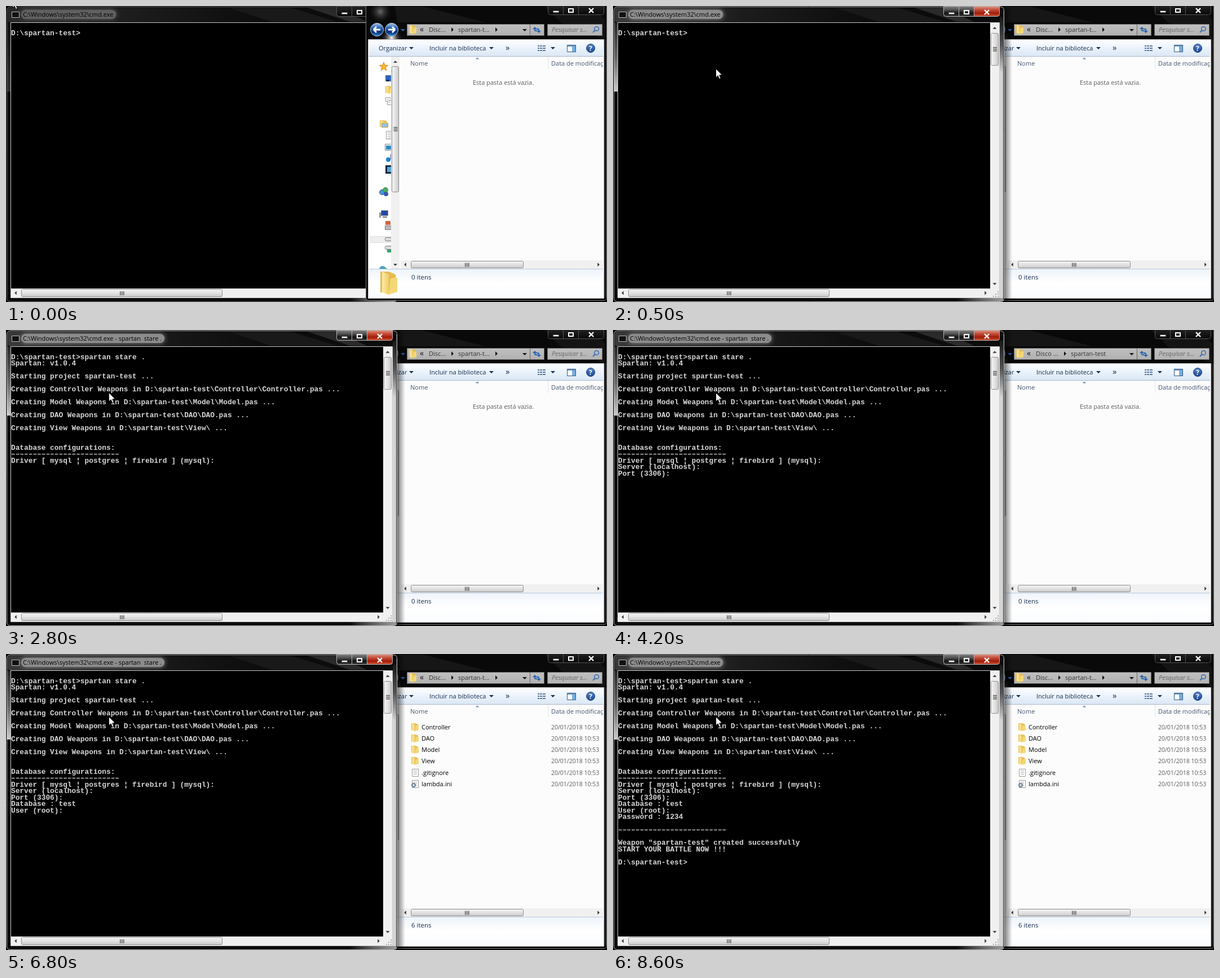
Write an HTML page with a canvas that moves like this. It is 1066 px wide and 526 px high and loops after 9.1 s.

```html
<!DOCTYPE html>
<html lang="pt">
<head>
<meta charset="utf-8">
<title>Terminal e pasta</title>
<style>
html, body { margin: 0; width: 100%; height: 100%; overflow: hidden; background: #000; }
canvas { display: block; }
</style>
</head>
<body>
<canvas id="stage" width="1066" height="526"></canvas>
<script>
const c = document.getElementById('stage').getContext('2d');
const LOOP = 9100, ACTIVATE = 300;
const UI = '"Open Sans", "Noto Sans", sans-serif';
const NAVY = '#142c4c';
const RULE = '–'.repeat(25);

// [time, row, text appended to that row]
const output = [
  [0, 0, 'D:\\spartan-test>'],
  [1000, 0, 's'], [1100, 0, 'p'], [1200, 0, 'a'], [1300, 0, 'r'], [1500, 0, 't'], [1600, 0, 'an'],
  [1800, 0, ' s'], [2000, 0, 't'], [2100, 0, 'a'], [2200, 0, 're'], [2500, 0, ' .'],
  [2800, 1, 'Spartan: v1.0.4'],
  [2800, 3, 'Starting project spartan-test ...'],
  [2800, 5, 'Creating Controller Weapons in D:\\spartan-test\\Controller\\Controller.pas ...'],
  [2800, 7, 'Creating Model Weapons in D:\\spartan-test\\Model\\Model.pas ...'],
  [2800, 9, 'Creating DAO Weapons in D:\\spartan-test\\DAO\\DAO.pas ...'],
  [2800, 11, 'Creating View Weapons in D:\\spartan-test\\View\\ ...'],
  [2800, 14, 'Database configurations:'],
  [2800, 15, RULE],
  [2800, 16, 'Driver [ mysql ¦ postgres ¦ firebird ] (mysql):'],
  [3600, 17, 'Server (localhost):'],
  [4200, 18, 'Port (3306):'],
  [4900, 19, 'Database : '],
  [6400, 19, 't'], [6500, 19, 'e'], [6600, 19, 's'], [6700, 19, 't'],
  [6800, 20, 'User (root):'],
  [7300, 21, 'Password : '],
  [7900, 21, '1'], [8100, 21, '2'], [8200, 21, '34'],
  [8500, 23, RULE],
  [8500, 25, 'Weapon "spartan-test" created successfully'],
  [8500, 26, 'START YOUR BATTLE NOW !!!'],
  [8600, 28, 'D:\\spartan-test>']
];

function box(x, y, w, h, fill, stroke, radius = 0) {
  c.beginPath();
  const inset = stroke ? 0.5 : 0;
  c.roundRect(x + inset, y + inset, w - 2 * inset, h - 2 * inset, radius);
  if (fill) { c.fillStyle = fill; c.fill(); }
  if (stroke) { c.strokeStyle = stroke; c.lineWidth = 1; c.stroke(); }
}

function shade(x0, y0, x1, y1, ...colors) {
  const g = c.createLinearGradient(x0, y0, x1, y1);
  colors.forEach((color, i) => g.addColorStop(i / (colors.length - 1), color));
  return g;
}

function poly(points, fill, stroke) {
  c.beginPath();
  points.forEach(([x, y]) => c.lineTo(x, y));
  c.closePath();
  c.fillStyle = fill;
  c.fill();
  if (stroke) { c.strokeStyle = stroke; c.lineWidth = 1; c.stroke(); }
}

function disc(x, y, r, fill, stroke) {
  c.beginPath();
  c.arc(x, y, r, 0, 7);
  c.fillStyle = fill;
  c.fill();
  if (stroke) { c.strokeStyle = stroke; c.lineWidth = 1; c.stroke(); }
}

function line(x0, y0, x1, y1, color, width = 1) {
  c.beginPath();
  c.moveTo(x0, y0);
  c.lineTo(x1, y1);
  c.strokeStyle = color;
  c.lineWidth = width;
  c.stroke();
}

function label(text, x, y, color, size = 11, style = '') {
  c.font = `${style} ${size}px ${UI}`;
  c.fillStyle = color;
  c.fillText(text, x, y);
}

function glow(x, y, r, color) {
  const g = c.createRadialGradient(x, y, 0, x, y, r);
  g.addColorStop(0, color);
  g.addColorStop(1, 'transparent');
  c.fillStyle = g;
  c.fillRect(x - r, y - r, 2 * r, 2 * r);
}

// angle in quarter turns: 0 right, 1 down, 2 left, 3 up
function arrow(x, y, quarter, color = '#222', size = 4) {
  c.save();
  c.translate(x, y);
  c.rotate(quarter * Math.PI / 2);
  poly([[-size / 2, -size], [size / 2, 0], [-size / 2, size]], color);
  c.restore();
}

function scrollBar(x, y, w, h, from, to) {
  const vertical = h > w;
  const mx = x + w / 2, my = y + h / 2, mid = Math.round((from + to) / 2);
  box(x, y, w, h, '#f0f0f0');
  if (vertical) {
    arrow(mx, y + 9, 3, '#333', 3.5);
    arrow(mx, y + h - 8, 1, '#333', 3.5);
    box(x + 1, from, w - 2, to - from, shade(x, 0, x + w, 0, '#fafafa', '#e2e2e2', '#c4c4c8'), '#8c8c8c', 2);
  } else {
    arrow(x + 8, my, 2, '#333', 3.5);
    arrow(x + w - 8, my, 0, '#333', 3.5);
    box(from, y + 1, to - from, h - 2, shade(0, y, 0, y + h, '#fafafa', '#e2e2e2', '#c4c4c8'), '#8c8c8c', 2);
  }
  for (let i = -1; i < 2; i++) {
    if (vertical) box(mx - 3, mid + i * 3 - 1, 7, 1.5, '#555');
    else box(mid + i * 3 - 1, my - 3, 1.5, 7, '#555');
  }
}

function windowButtons(x, y, bottom, active) {
  const glass = active ? shade(0, y, 0, bottom, '#888', '#555', '#151515', '#3a3a3a')
                       : shade(0, y, 0, bottom, '#242424', '#080808');
  const edge = active ? '#b5b5b5' : '#555';
  box(x, y, 28, bottom - y, glass, edge, [0, 0, 0, 4]);
  box(x + 27, y, 28, bottom - y, glass, edge);
  box(x + 54, y, 46, bottom - y,
    active ? shade(0, y, 0, bottom, '#e0a090', '#c4513c', '#a11c0a', '#d0573a') : glass, edge, [0, 0, 4, 0]);
  const my = bottom - 8;
  box(x + 9, my, 11, 4, '#fff', '#555');
  c.strokeStyle = '#fff';
  c.lineWidth = 2;
  c.strokeRect(x + 37, my - 3, 8, 6);
  line(x + 73, my - 4, x + 81, my + 4, '#fff', 2.4);
  line(x + 81, my - 4, x + 73, my + 4, '#fff', 2.4);
}

function folder(x, y, w, h) {
  poly([[x, y], [x + w * .5, y], [x + w * .9, y + h * .12], [x + w * .9, y + h * .9], [x, y + h * .9]], '#e3bc55');
  poly([[x + w * .1, y], [x + w * .5, y + h * .12], [x + w * .5, y + h], [x + w * .1, y + h * .9]],
    shade(x, 0, x + w * .5, 0, '#fff3b8', '#f0cd68'));
  poly([[x + w * .6, y + h * .3], [x + w, y + h * .25], [x + w, y + h * .88], [x + w * .5, y + h]], '#f4d878');
}

function sheet(x, y, w, h) {
  box(x, y, w, h, '#fff', '#999');
  for (let i = 3; i < h - 2; i += 3) box(x + 3, y + i, w - 6, 1, '#aab');
}

function sidebar() {
  c.save();
  c.beginPath();
  c.rect(644, 90, 39, 378);
  c.clip();
  box(644, 90, 39, 378, '#fff');
  const star = Array.from({ length: 10 }, (_, i) => {
    const a = i * Math.PI / 5 - Math.PI / 2, r = i % 2 ? 3.4 : 8;
    return [670 + r * Math.cos(a), 108 + r * Math.sin(a)];
  });
  poly(star, '#ffb52e', '#d9860f');
  box(673, 123, 14, 11, '#2567c4', '#667');
  box(675, 131, 4, 3, '#123');
  folder(673, 142, 13, 14);
  sheet(673, 162, 9, 8);
  sheet(676, 168, 8, 8);
  folder(663, 203, 14, 13);
  box(666, 208, 12, 8, '#8fc7e8', '#c59b3c');
  sheet(674, 222, 12, 15);
  box(672, 245, 14, 12, '#e8f2fa', '#888');
  box(674, 248, 10, 7, '#338bc0');
  disc(678, 273, 4, '#1684d8');
  line(682, 263, 682, 273, '#347');
  box(673, 283, 13, 15, '#18293a');
  box(676, 286, 8, 9, '#55a5d8');
  disc(667, 331, 4.5, '#4b96d8', '#357');
  disc(673, 327, 4.5, '#4cae5d', '#386');
  disc(674, 334, 4, '#3559b0');
  box(665, 363, 13, 10, '#2446a8', '#888');
  box(668, 374, 8, 2, '#777');
  box(662, 367, 3, 9, '#ccc', '#777');
  box(673, 382, 9, 7, '#d0673c');
  box(672, 390, 14, 8, '#bbb', '#777');
  box(646, 409, 38, 12, '#eee', '#ddd');
  box(672, 411, 14, 7, '#ddd', '#777', 2);
  box(672, 426, 14, 7, '#ddd', '#777', 2);
  box(676, 433, 8, 5, '#36a66c');
  disc(668, 468, 6, '#4a9fc2');
  disc(672, 469, 4, '#4cae5d');
  c.restore();
  scrollBar(683, 90, 15, 378, 107, 331);
}

function addressBar(t) {
  [658, 684].forEach((x, i) => {
    disc(x, 42, 11.5, shade(0, 31, 0, 54, '#9fc0e4', '#2d67b5', '#0a2f78', '#2b8fe0'), '#b9c8d8');
    const dir = i ? 1 : -1;
    line(x - 6, 42, x + 6, 42, '#fff', 3);
    line(x + dir * 6, 42, x + dir, 37, '#fff', 3);
    line(x + dir * 6, 42, x + dir, 47, '#fff', 3);
  });
  arrow(704, 43, 1, '#2a62a8');
  box(711, 32, 244, 21, shade(0, 32, 0, 53, '#c0c0c0', '#b0b0b0'), '#666');
  folder(715, 34, 13, 16);
  const refreshing = t >= 3800 && t < 4600;
  label('«', 734, 46, '#111', 14);
  label(refreshing ? 'Disco ...' : 'Disc...', 750, 46, '#333');
  arrow(refreshing ? 802 : 792, 42, 0, '#111');
  label(refreshing ? 'spartan-test' : 'spartan-t...', refreshing ? 812 : 802, 46, '#333');
  if (!refreshing) arrow(870, 42, 0, '#111');
  arrow(920, 43, 1, '#111');
  line(929.5, 33, 929.5, 52, '#666');
  for (const [x, y, q] of [[938, 39, 3], [945, 46, 1]]) {
    const back = q === 3 ? 5 : -5;
    arrow(x, y, q, '#2563b5');
    line(x, y, x, y + back, '#2563b5', 2);
    line(x, y + back, x + back * .8, y + back, '#2563b5', 2);
  }
  box(960, 32, 98, 21, shade(0, 32, 0, 53, '#c0c0c0', '#b4b4b4'), '#666');
  label('Pesquisar s...', 968, 46, '#666', 11, 'italic');
  line(1041, 47, 1045, 43, '#356fb5', 2);
  c.beginPath();
  c.arc(1047.5, 40.5, 3.8, 0, 7);
  c.strokeStyle = '#356fb5';
  c.lineWidth = 1.6;
  c.stroke();
}

function toolbar() {
  box(644, 61, 415, 28, shade(0, 61, 0, 89, '#fdfeff', '#eaf2fb', '#dbe7f5'));
  line(644, 89.5, 1059, 89.5, '#a8b8cc');
  label('Organizar', 661, 79, NAVY);
  arrow(719, 75, 1, NAVY);
  label('Incluir na biblioteca', 751, 79, NAVY);
  arrow(861, 75, 1, NAVY);
  label('»', 886, 79, NAVY, 15);
  for (let i = 0; i < 3; i++) {
    box(943, 70 + i * 4, 3, 2, '#57779c');
    box(947, 70 + i * 4, 4, 2, '#57779c');
    box(952, 70 + i * 4, 5, 2, '#57779c');
  }
  arrow(970, 75, 1, NAVY);
  box(995, 69, 16, 13, '#fff', '#31577f');
  box(996, 70, 14, 2, '#6695c2');
  box(1004, 72, 6, 9, '#78aede');
  disc(1037, 75, 7.5, shade(0, 67, 0, 83, '#5d8ccc', '#153f91'), '#164078');
  label('?', 1034, 79.5, '#fff', 12, 'bold');
}

function explorer(t) {
  box(638, -4, 428, 528, '#090909', '#777', 5);
  poly([[690, 1], [740, 1], [850, 29], [694, 29]], '#161616');
  poly([[955, 1], [1040, 1], [1062, 24], [1062, 59], [985, 30]], '#141414');
  box(1061, 60, 4, 458, '#1b1b1b');
  glow(664, 10, 22, 'rgba(160,160,160,.65)');
  glow(684, 57, 20, '#fff');
  box(642, 59, 419, 461, '#fff', '#bbb');
  windowButtons(961, -2, 16, false);
  addressBar(t);
  toolbar();

  box(698, 90, 361, 362, '#fcfcfc');
  sidebar();
  arrow(836, 93, 3, '#5d86ad', 3);
  line(961.5, 90, 961.5, 112, '#e2e5ea');
  c.save();
  c.beginPath();
  c.rect(700, 90, 359, 362);
  c.clip();
  label('Nome', 717, 106, '#43566f');
  label('Data de modificação', 967, 106, '#43566f');
  const loaded = t >= 4300;
  if (loaded) {
    ['Controller', 'DAO', 'Model', 'View', '.gitignore', 'lambda.ini'].forEach((name, i) => {
      const y = Math.round(130 + i * 20.15);
      if (i < 4) folder(719, y - 7, 13, 14);
      else sheet(720, y - 7, 12, 14);
      if (i === 5) {
        disc(723, y + 2, 3.5, '#8fa7bb', '#567');
        disc(723, y + 2, 1.2, '#fff');
      }
      label(name, 737, y + 4, '#000');
      label('20/01/2018 10:53', 967, y + 4, '#5c5c5c', 10.5);
    });
  } else {
    label('Esta pasta está vazia.', 828, 140, '#5c5c5c');
  }
  c.restore();
  scrollBar(700, 452, 359, 15, 718, 918);

  box(644, 467, 415, 52, shade(0, 467, 0, 519, '#eef4fb', '#fff', '#fafcff'));
  line(644, 467.5, 1059, 467.5, '#b7cbe2');
  folder(664, 472, 30, 41);
  label(`${loaded ? 6 : 0} itens`, 719, 486, NAVY, 11.5);
}

function consoleText(t) {
  const rows = [];
  for (const [time, row, text] of output) if (t >= time) rows[row] = (rows[row] || '') + text;
  c.font = 'bold 12.8px "Liberation Mono", monospace';
  c.fillStyle = '#d8d8d8';
  rows.forEach((text, row) => c.fillText(text, 9, Math.round(51.7 + row * 11.5)));
  if (t >= 5600 && t < 6100) box(94, 269, 8, 3, '#d8d8d8');
}

// Translucent border: shows the blurred backdrop around the console.
function glassFrame(active) {
  box(1, 1, 693, 525, '#0c0c0c', active ? '#bbb' : '#666', 6);
  box(3, 3, 689, 26, shade(0, 0, 690, 0, active ? '#3a3a3a' : '#2a2a2a', '#1c1c1c', '#0c0c0c', '#0c0c0c'), null, 4);
  poly([[395, 3], [505, 3], [587, 28], [470, 28]], '#191919');
  poly([[535, 3], [586, 3], [640, 28], [610, 28]], '#2a2a2a');
  box(2, 30, 6, 122, active ? shade(0, 30, 0, 152, '#2a2a2a', '#666', '#ccc') : shade(0, 30, 0, 152, '#111', '#333'));
  box(600, 519, 92, 6, shade(610, 0, 692, 0, 'rgba(200,200,200,0)', active ? '#999' : '#ccc'));
  if (active) {
    box(686, 19, 6, 500, shade(0, 19, 0, 119, '#181818', '#555', '#d5d5d5'));
    line(692.5, 8, 692.5, 518, '#333');
  }
}

function terminal(t, active) {
  if (active) box(693, 2, 15, 522, shade(693, 0, 708, 0, 'rgba(0,0,0,.55)', 'rgba(0,0,0,0)'));
  glassFrame(active);

  const running = t >= 2800 && t < 8600;
  const title = 'C:\\Windows\\system32\\cmd.exe' + (running ? ' - spartan  stare .' : '');
  c.font = `11px ${UI}`;
  const width = c.measureText(title).width;
  c.save();
  c.shadowColor = active ? '#8c8c8c' : '#606060';
  c.shadowBlur = 8;
  box(27, 7, width + 8, 16, active ? '#8c8c8c' : '#606060', null, 8);
  c.restore();
  box(10, 10, 14, 11, '#111', '#bbb');
  label(title, 30, 19, '#000');
  windowButtons(586, 0, 19, active);

  box(8, 29, 678, 490, '#000', '#ccc');
  scrollBar(669, 30, 16, 472, 48, 106);
  scrollBar(9, 502, 660, 16, 27, 384);
  box(669, 502, 16, 16, '#f0f0f0');
  for (let i = 0; i < 3; i++)
    for (let j = 0; j <= i; j++) box(682 - j * 4, 507 + i * 4, 2, 2, '#aaa');
  consoleText(t);
}

function pointer(t) {
  const p = Math.min(1, Math.floor(t / 100) / 5);
  const eased = p * p * (3 - 2 * p);
  c.save();
  c.translate(11.5 + 171 * eased, -12.5 + 124 * eased);
  poly([[0, 0], [0, 15.5], [3.6, 12.3], [6, 18], [8.6, 17], [6.2, 11.4], [11, 11]], '#fff', '#000');
  c.restore();
}

function draw(now) {
  const t = now % LOOP;
  c.fillStyle = '#000';
  c.fillRect(0, 0, 1066, 526);
  if (t < ACTIVATE) {
    terminal(t, false);
    explorer(t);
  } else {
    explorer(t);
    terminal(t, true);
  }
  pointer(t);
  requestAnimationFrame(draw);
}
requestAnimationFrame(draw);
</script>
</body>
</html>
```
